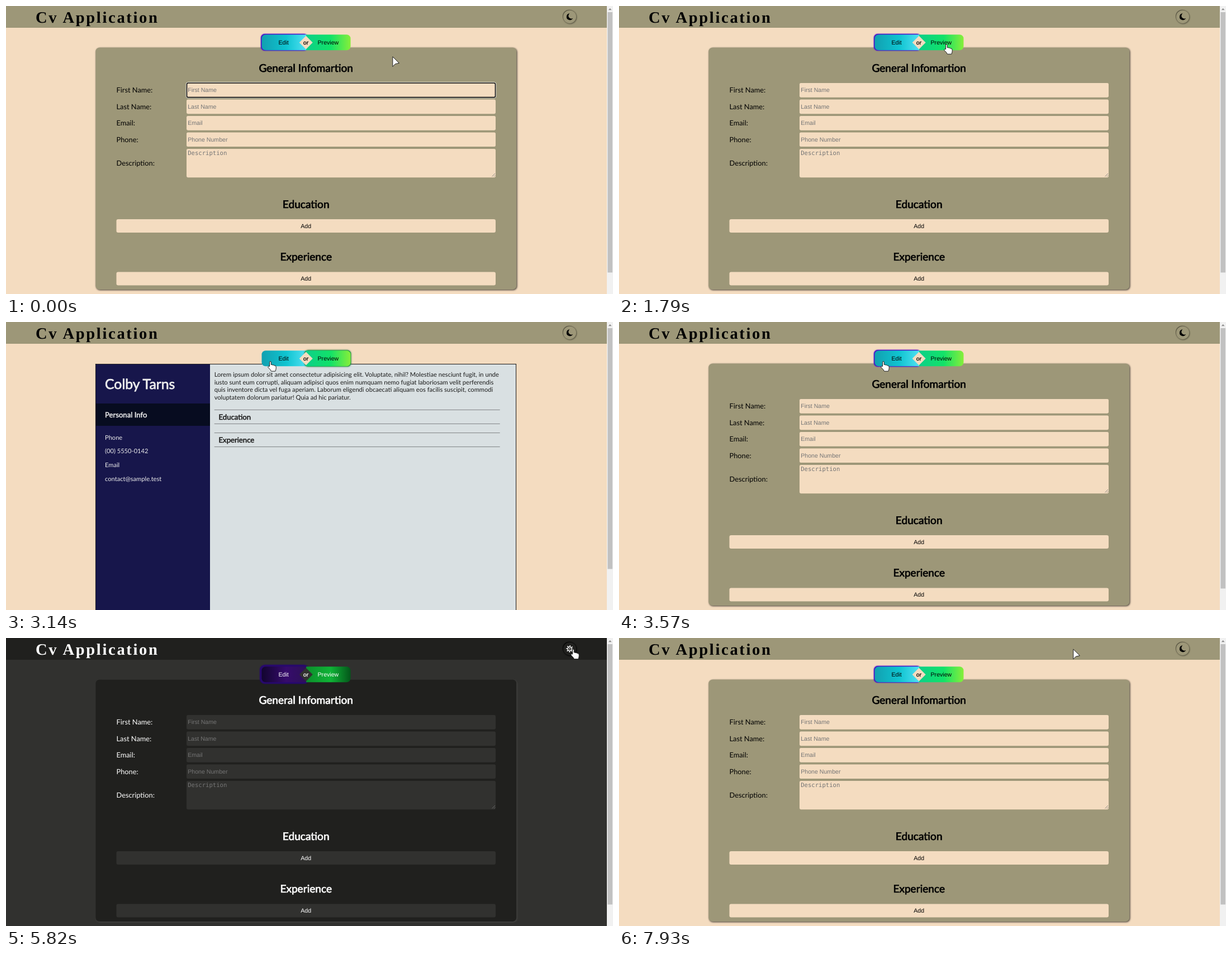
Animation of 1086x516 px, one loop 8 s. Source, as an HTML page:

```html
<!DOCTYPE html>
<html lang="en">
<head>
<meta charset="utf-8">
<title>Cv Application</title>
<style>
  html, body { margin: 0; width: 100%; height: 100%; overflow: hidden; }
  svg { display: block; width: 1086px; height: 516px; text-rendering: geometricPrecision; }
  #app {
    --page: #f4dcc0; --panel: #9d9778; --ink: #000; --hint: #757575;
    --shade: rgba(0, 0, 0, .75); --knob: #5d5946;
    --edit1: #12a0b0; --edit2: #0fc4d0; --edit3: #4fe0f2;
    --view1: #0cd088; --view2: #12e268; --view3: #86ee3a;
    --glow: #4a12c8;
    font: 12.8px Lato, sans-serif; fill: var(--ink);
  }
  #app.dark {
    --page: #31312f; --panel: #20201e; --ink: #fff; --hint: #757575;
    --shade: #484846; --knob: #050505;
    --edit1: #12052f; --edit2: #360b6c; --edit3: #2d1157;
    --view1: #0c8f2c; --view2: #0fb336; --view3: #04561a;
    --glow: #27086e;
  }
  .page { fill: var(--page); }
  .panel { fill: var(--panel); }
  .ctl { font: 10.6px "Liberation Sans", Arial, sans-serif; }
  .mono { font: 10.6px "DejaVu Sans Mono", monospace; }
  .hint { fill: var(--hint); }
  .mid { text-anchor: middle; }
  .title { font: bold 28.6px "Liberation Serif", serif; letter-spacing: 2.65px; }
  .bold { stroke: currentColor; stroke-width: .65px; }
  .h2 { font-size: 19.1px; stroke: var(--ink); stroke-width: .7px; }
  .card { filter: drop-shadow(1px 1px 1.8px var(--shade)); }
  .knob { filter: drop-shadow(1.5px 1.5px 1.3px var(--knob)) drop-shadow(-.6px -.6px .7px var(--knob)); }
  .small { font-size: 11.13px; }
  .h3 { font-size: 13.15px; stroke-width: .5px; }
  .glow { fill: var(--glow); filter: drop-shadow(0 0 1.2px var(--glow)); }
  .dark .glow { stroke: var(--glow); stroke-width: 3.6px; }
  .viewGlow { fill: #1d9a48; filter: drop-shadow(0 0 1.6px #14702c); }
  #sun, .dark #moon { display: none; }
  .dark #sun { display: inline; }
  .cursor { fill: #fff; stroke: #1c1c1c; stroke-width: 1px; stroke-linejoin: round; }
</style>
</head>
<body>
<svg id="app" viewBox="0 0 1086 516" xmlns="http://www.w3.org/2000/svg">
  <defs>
    <linearGradient id="editFill">
      <stop offset="0" style="stop-color:var(--edit1)"/>
      <stop offset=".55" style="stop-color:var(--edit2)"/>
      <stop offset="1" style="stop-color:var(--edit3)"/>
    </linearGradient>
    <linearGradient id="viewFill">
      <stop offset="0" style="stop-color:var(--view1)"/>
      <stop offset=".55" style="stop-color:var(--view2)"/>
      <stop offset="1" style="stop-color:var(--view3)"/>
    </linearGradient>
  </defs>

  <rect class="page" width="1086" height="516"/>
  <rect class="panel" width="1075" height="39"/>
  <text class="title" x="53" y="30">Cv Application</text>

  <circle class="panel knob" cx="1008.5" cy="19.3" r="11.6"/>
  <path id="moon" d="M1008.6 13.2A6 6 0 1 0 1014.3 21.8A5.05 5.05 0 0 1 1008.6 13.2Z"/>
  <g id="sun" fill="none" stroke="#fff">
    <circle cx="1008.5" cy="19.4" r="3.5" stroke-width="1.5"/>
    <circle cx="1008.5" cy="19.4" r="5.2" stroke-width="2.2" stroke-dasharray="1.6 2.484" stroke-dashoffset=".8"/>
    <circle cx="1008.5" cy="19.4" r="1.1" fill="#fff" stroke="none"/>
  </g>

  <g id="form">
    <rect class="panel card" x="160.3" y="74.5" width="753" height="433.5" rx="7"/>
    <text class="h2 mid" x="536.7" y="117.6">General Infomartion</text>
    <g id="fields"></g>
    <path d="M869.5 305.5l5.5-5.5M872.8 305.7l2.4-2.4" stroke="#777" stroke-width=".8"/>
    <g id="focus" fill="none">
      <rect x="322.3" y="136.8" width="554.4" height="28" rx="3.2" stroke="#fff" stroke-width=".9"/>
      <rect x="323.5" y="138" width="552" height="25.6" rx="2.4" stroke="#101010" stroke-width="1.6"/>
      <path id="caret" d="M325.6 144v12" stroke="#000" stroke-width=".9"/>
    </g>
    <g id="sections"></g>
  </g>

  <g id="preview" fill="#1b1b1b" color="#1b1b1b">
    <rect x="160.4" y="75.4" width="752.2" height="460" fill="#d9e0e2" stroke="#000" stroke-width=".9"/>
    <rect x="160.9" y="75.9" width="204.1" height="450" fill="#17164b"/>
    <rect x="160.9" y="146" width="204.1" height="40" fill="#070c20"/>
    <g fill="#ececec" color="#ececec" class="small">
      <text class="bold" x="177" y="120" style="font-size:24.8px;stroke-width:.8px">Colby Tarns</text>
      <text class="bold h3" x="177" y="171.2">Personal Info</text>
      <text x="177" y="210.6">Phone</text>
      <text x="177" y="235.3">(00) 5550-0142</text>
      <text x="177" y="260">Email</text>
      <text x="177" y="284.6">contact@sample.test</text>
    </g>
    <g class="small">
      <text x="372.7" y="98">Lorem ipsum dolor sit amet consectetur adipisicing elit. Voluptate, nihil? Molestiae nesciunt fugit, in unde</text>
      <text x="372.7" y="111.6">iusto sunt eum corrupti, aliquam adipisci quos enim numquam nemo fugiat laboriosam velit perferendis</text>
      <text x="372.7" y="125.2">quis inventore dicta vel fuga aperiam. Laborum eligendi obcaecati aliquam eos facilis suscipit, commodi</text>
      <text x="372.7" y="138.8">voluptatem dolorum pariatur! Quia ad hic pariatur.</text>
    </g>
    <path d="M372.7 157.4H883.7M372.7 182.4H883.7M372.7 198.6H883.7M372.7 223.6H883.7" stroke="#6f7375" stroke-width=".85"/>
    <text class="bold h3" x="380.5" y="174.5">Education</text>
    <text class="bold h3" x="380.5" y="215.9">Experience</text>
  </g>

  <g id="tabs" class="ctl mid">
    <rect id="editGlow" class="glow" x="456" y="50" width="84" height="30" rx="7"/>
    <path d="M537 51.2H464.5a7 7 0 0 0-7 7v14a7 7 0 0 0 7 7H537Z" fill="url(#editFill)"/>
    <rect id="viewGlow" class="viewGlow" x="534" y="50.6" width="83.2" height="29.2" rx="6.5"/>
    <path d="M537 51.2H609.5a7 7 0 0 1 7 7v14a7 7 0 0 1-7 7H537Z" fill="url(#viewFill)"/>
    <path class="page" d="M536.7 53.4l12 12l-12 12l-12-12Z"/>
    <text x="496.6" y="69">Edit</text>
    <text x="576.4" y="69">Preview</text>
    <text x="536.6" y="68.8" style="font:10.2px Lato,sans-serif;stroke:var(--ink);stroke-width:.25px">or</text>
  </g>

  <g id="scrollbar">
    <rect x="1075" width="11" height="516" fill="#f1f1f1"/>
    <path d="M1077.8 7.2l2.9-3.2l2.9 3.2Z" fill="#8a8a8a"/>
    <rect id="thumb" x="1076.4" y="11" width="8.6" fill="#c1c1c1"/>
  </g>

  <path id="arrow" class="cursor" d="M.8 .8V18.6L5.3 13.9L12.4 12.3Z"/>
  <path id="hand" class="cursor" d="M3.6 9.6V2.2Q3.6 .6 4.9 .6T6.3 2.2V6.6Q8 5.8 9 7.1Q10.7 6.5 11.6 7.8Q14.9 7.4 15.2 10.4V13.2Q14.9 16 13.8 18.2H6.6Q5.4 15.4 1.2 11.6Q.3 9.6 1.8 9.1Q2.8 8.9 3.6 9.6Z"/>
</svg>

<script>
const LOOP = 8000;
const $ = id => document.getElementById(id);

// label, hint, top, height, label baseline
const fields = [
  ['First Name:', 'First Name', 138, 25.7, 155.4],
  ['Last Name:', 'Last Name', 167.5, 25.7, 185],
  ['Email:', 'Email', 197, 25.7, 214.4],
  ['Phone:', 'Phone Number', 226.4, 25.7, 243.9],
  ['Description:', 'Description', 256, 51.2, 286.4]
];
$('fields').innerHTML = fields.map(([label, hint, top, height, base], i) => {
  const area = i === 4;
  return `<text x="197.5" y="${base}">${label}</text>
    <rect class="page" x="323" y="${top}" width="553" height="${height}" rx="2.4"/>
    <text class="hint ${area ? 'mono' : 'ctl'}" x="325.2" y="${top + (area ? 11.3 : 16.2)}">${hint}</text>`;
}).join('');

$('sections').innerHTML = [['Education', 361.8], ['Experience', 456.4]].map(([name, y]) =>
  `<text class="h2 mid" x="536.7" y="${y}">${name}</text>
   <rect class="page" x="197.5" y="${y + 20.2}" width="678.5" height="23.9" rx="3.2"/>
   <text class="ctl mid" x="536.7" y="${y + 35.7}">Add</text>`).join('');

// time, pointer shape, left, top
const pointer = [
  [0, 'arrow', 691, 90],
  [710, 'arrow', 682, 90], [780, 'arrow', 664, 88], [860, 'arrow', 643, 84], [930, 'arrow', 624, 80],
  [1000, 'hand', 600, 73], [1070, 'hand', 592, 70], [1150, 'hand', 585, 69], [1290, 'hand', 581, 68],
  [2860, 'arrow', 603, 80], [2930, 'hand', 556, 75], [3000, 'hand', 503, 71], [3140, 'hand', 468, 70],
  [3890, 'arrow', 556, 44], [3960, 'arrow', 713, 6], [4040, 'none', 0, 0],
  [4460, 'arrow', 1028, 1], [4530, 'hand', 1018, 9], [4600, 'hand', 1013, 16], [4680, 'hand', 1010, 19.5],
  [7860, 'arrow', 906, 19.3], [7930, 'arrow', 812, 19.3]
];
const within = (t, from, to) => t >= from && t < to;
const show = (id, on) => { $(id).style.display = on ? '' : 'none'; };

function draw(t) {
  const preview = within(t, 1930, 3570);
  show('preview', preview);
  show('form', !preview);
  show('editGlow', !preview);
  show('viewGlow', preview);
  $('thumb').setAttribute('height', preview ? 431.5 : 466.5);
  $('app').classList.toggle('dark', within(t, 5820, 7460));

  show('focus', t < 1790);
  show('caret', within(t, 70, 710) || within(t, 1290, 1790));

  const [, shape, x, y] = pointer.findLast(step => step[0] <= t);
  for (const id of ['arrow', 'hand']) {
    show(id, id === shape);
    $(id).setAttribute('transform', `translate(${x} ${y})`);
  }
}

const start = performance.now();
function tick() {
  draw((performance.now() - start) % LOOP);
  requestAnimationFrame(tick);
}
tick();
</script>
</body>
</html>
```
